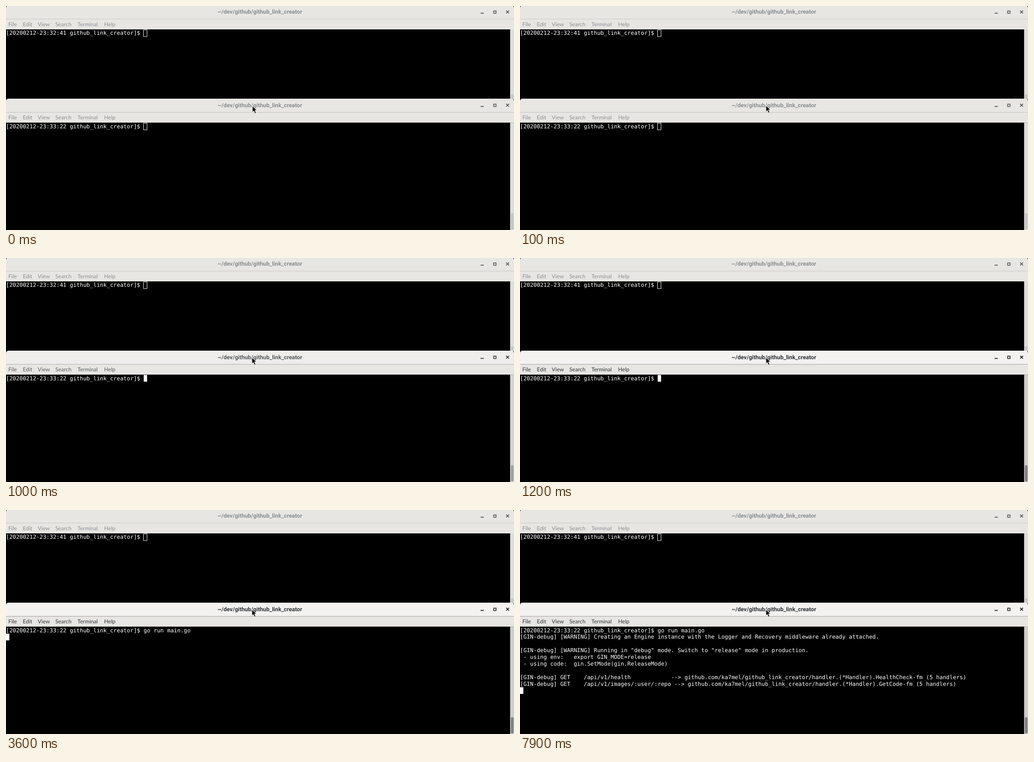
An HTML page for the animation above (8 s loop, 1125x498 px).

```html
<!DOCTYPE html>
<html lang="en">
<head>
<meta charset="utf-8">
<title>Terminal windows</title>
<style>
  html, body { margin: 0; width: 100%; height: 100%; overflow: hidden; background: #000; }
  svg { display: block; width: 1125px; height: 498px; }
  text { white-space: pre; text-rendering: geometricPrecision; }
  .title { font: 700 12.63px Roboto, "Noto Sans", sans-serif; text-anchor: middle; }
  .menu { font: 400 12.1px Lato, "Noto Sans", sans-serif; }
  .term { font: 400 12.355px "DejaVu Sans Mono", monospace; fill: #fff; }
</style>
</head>
<body>
<svg id="stage" viewBox="0 0 1125 498" xmlns="http://www.w3.org/2000/svg"></svg>
<script>
const LOOP = 8000;
const CELL_W = 7.438, CELL_H = 14.88;
const BAR_TOP = -1.3, SCREEN_TOP = 52, ROW_TOP = 52.8;
const COMMAND = "go run main.go ";
const MENU = { File: 6, Edit: 38, View: 71, Search: 110, Terminal: 159, Help: 218 };
const HANDLER = "github.com/ka7mel/github_link_creator/handler.(*Handler).";
const OUTPUT = [
  "[GIN-debug] [WARNING] Creating an Engine instance with the Logger and Recovery middleware already attached.",
  "",
  '[GIN-debug] [WARNING] Running in "debug" mode. Switch to "release" mode in production.',
  " - using env:   export GIN_MODE=release",
  " - using code:  gin.SetMode(gin.ReleaseMode)",
  "",
  route("/api/v1/health", "HealthCheck"),
  route("/api/v1/images/:user/:repo", "GetCode")
];

// Colours as [unfocused, focused]
const THEME = {
  bar: [[231, 230, 227], [243, 242, 241]],
  edge: [[203, 202, 198], [169, 168, 165]],
  label: [[139, 142, 143], [46, 52, 54]],
  icon: [[88, 91, 92], [32, 36, 38]],
  trough: [[222, 222, 219], [206, 206, 203]],
  thumb: [[197, 199, 198], [126, 129, 130]]
};

const stage = document.getElementById("stage");

function route(path, name) {
  return "[GIN-debug] GET    " + path.padEnd(25) + " --> " + HANDLER + name + "-fm (5 handlers)";
}

function add(parent, tag, attrs, text) {
  const el = document.createElementNS("http://www.w3.org/2000/svg", tag);
  for (const key in attrs) el.setAttribute(key, attrs[key]);
  if (text) el.textContent = text;
  parent.appendChild(el);
  return el;
}

function makeWindow(y, height, clock, thumbHeight) {
  const g = add(stage, "g", { transform: `translate(0 ${y})` });
  const parts = [];
  const part = (role, prop, tag, attrs, text) => {
    parts.push({ role, prop, el: add(g, tag, attrs, text) });
  };
  const prompt = `[20200212-${clock} github_link_creator]$ `;

  add(g, "rect", { y: SCREEN_TOP, width: 1125, height: height - SCREEN_TOP });
  part("trough", "fill", "rect", {
    x: 1116.4, y: SCREEN_TOP, width: 8.6, height: height - SCREEN_TOP
  });
  part("bar", "fill", "path", {
    d: `M0 29V${BAR_TOP + 6}q0-6 6-6H1119q6 0 6 6V29Z`
  });
  add(g, "rect", { y: 29, width: 1125, height: SCREEN_TOP - 29, fill: "#e7e6e3" });
  part("edge", "fill", "rect", { y: 28.5, width: 1125, height: 1 });
  part("thumb", "fill", "rect", {
    x: 1118, y: height - thumbHeight, width: 6, height: thumbHeight - 1, rx: 3
  });

  part("label", "fill", "text", { class: "title", x: 562.3, y: 17.3 }, "~/dev/github/github_link_creator");
  for (const name in MENU)
    part("label", "fill", "text", { class: "menu", x: MENU[name] - 0.7, y: 45 }, name);

  part("icon", "fill", "rect", { x: 1051, y: 15, width: 7, height: 1.9 });
  part("icon", "stroke", "rect", {
    x: 1080, y: 10.9, width: 5.3, height: 5.3, fill: "none", "stroke-width": 1.7
  });
  part("icon", "stroke", "path", { d: "M1107.7 10.2l6.2 6.2m0-6.2l-6.2 6.2", "stroke-width": 1.8 });

  const line = (i, text) =>
    add(g, "text", { class: "term", x: 0, y: ROW_TOP + i * CELL_H + 11.5 }, text);
  const first = line(0, prompt);
  const cursor = add(g, "rect", { stroke: "#fff" });

  function setCursor(col, row, solid) {
    const inset = solid ? 0 : 0.3;
    const box = {
      x: col * CELL_W + (solid ? 0 : -0.4),
      y: ROW_TOP + row * CELL_H + inset,
      width: CELL_W + inset,
      height: CELL_H,
      fill: solid ? "#fff" : "none",
      "stroke-width": solid ? 0 : 1
    };
    for (const key in box) cursor.setAttribute(key, box[key]);
  }

  function setFocus(amount) {
    for (const { role, prop, el } of parts) {
      const [from, to] = THEME[role];
      const mix = from.map((c, i) => Math.round(c + (to[i] - c) * amount));
      el.setAttribute(prop, `rgb(${mix})`);
    }
  }

  setFocus(0);
  setCursor(prompt.length, 0, false);
  return { prompt, first, line, setCursor, setFocus };
}

makeWindow(0, 207.3, "23:32:41", 11.3);
const lower = makeWindow(207.3, 290.7, "23:33:22", 37.5);
const output = OUTPUT.map((text, i) => lower.line(i + 1, text));
const pointer = add(stage, "path", {
  d: "M0 0V13.4L3 10.6L5.6 16.3L8 15.2L5.4 9.6H9.6Z",
  stroke: "#fff", "stroke-width": 0.8
});

function draw(t) {
  // The focus fade advances once every 100 ms
  const step = Math.min(3, Math.max(0, Math.floor((t - 900) / 100))) / 3;
  lower.setFocus(1 - (1 - step) ** 2);

  const typed = t >= 2700 ? COMMAND : "";
  const done = t >= 7900;
  lower.first.textContent = lower.prompt + typed;
  for (const el of output) el.setAttribute("visibility", done ? "visible" : "hidden");

  if (t >= 3600) lower.setCursor(0, done ? OUTPUT.length + 1 : 1, true);
  else lower.setCursor((lower.prompt + typed).length, 0, t >= 900);

  pointer.setAttribute("transform", t < 100 ? "translate(545.8 222.4)" : "translate(544.8 221.4)");
}

const start = performance.now();
function tick() {
  draw((performance.now() - start) % LOOP);
  requestAnimationFrame(tick);
}
tick();
</script>
</body>
</html>
```
